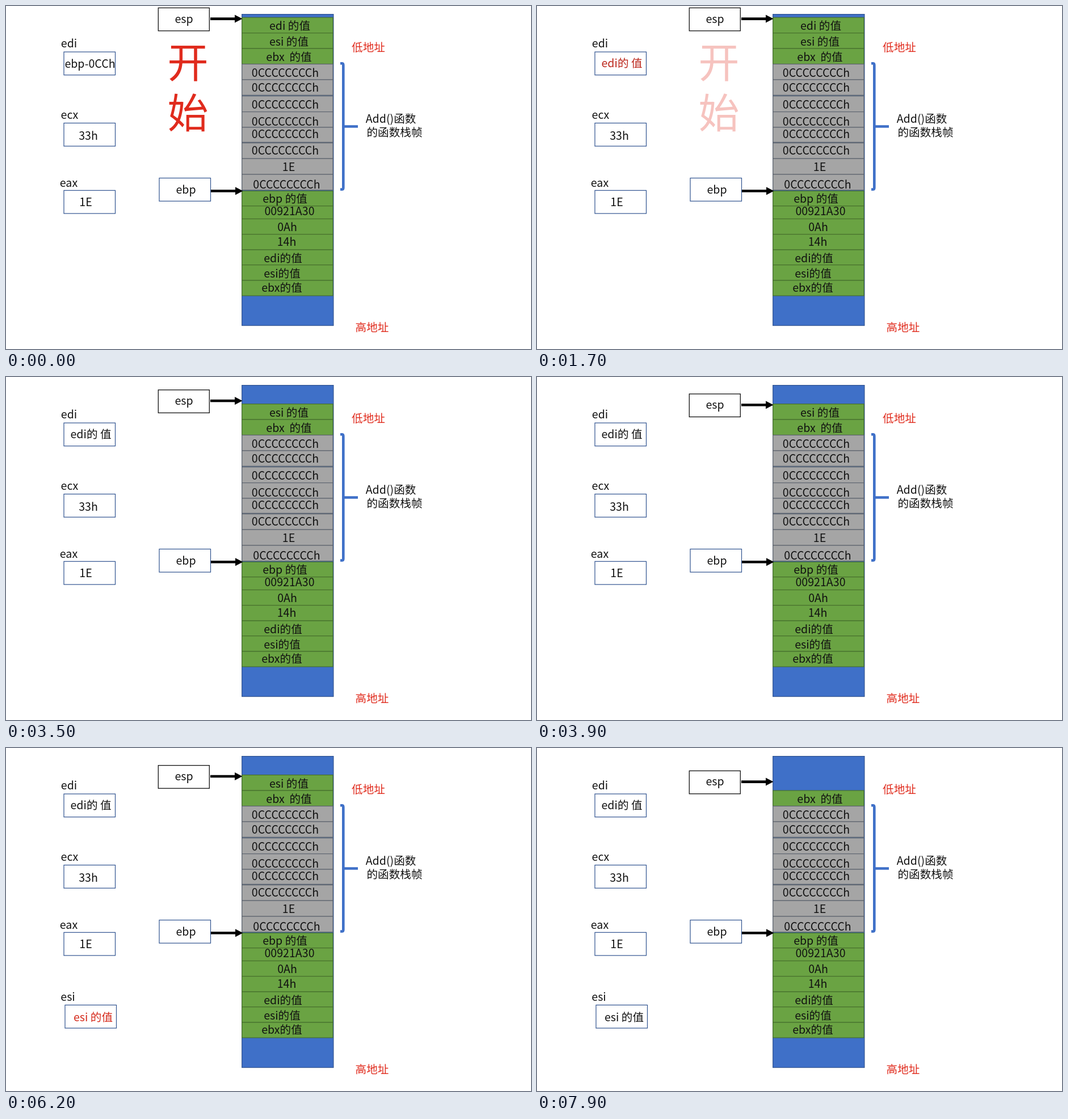
An HTML page that plays this animation: 925x605 px, repeating every 8000 ms.

```html
<!DOCTYPE html>
<html lang="zh-CN">
<head>
<meta charset="utf-8">
<title>Stack frame</title>
<style>
  html, body { margin: 0; width: 100%; height: 100%; overflow: hidden; background: #fff; }
  svg { display: block; width: 925px; height: 605px; }
  text {
    font: 350 19.6px "Noto Sans CJK SC", "Noto Sans CJK", "Noto Sans", sans-serif;
    text-anchor: middle; white-space: pre; fill: #111;
  }
  .red { fill: #e02b1d; }
  .big { font-size: 72px; }
</style>
</head>
<body>
<svg id="stage" viewBox="0 0 925 605"></svg>
<script>
const LOOP = 8000, STEP = 100;
const GREEN = ['#6aa343', '#47702d'], GRAY = ['#a5a5a5', '#5f6670'];
const BLUE = '#3f70c8', NAVY = '#2f528f', INK = '#111', RED = [224, 43, 29];
const stage = document.getElementById('stage');

function add(tag, attrs, parent = stage) {
  const el = document.createElementNS('http://www.w3.org/2000/svg', tag);
  for (const key in attrs) el.setAttribute(key, attrs[key]);
  parent.appendChild(el);
  return el;
}
const group = () => add('g', {});
function label(str, x, y, parent, cls = '') {
  const el = add('text', { x, y, class: cls }, parent);
  el.textContent = str;
  return el;
}
function box(x, y, width, height, fill, stroke, parent, weight = 1.2) {
  return add('rect', { x, y, width, height, fill, stroke, 'stroke-width': weight }, parent);
}
function arrow(x, y, parent) {
  add('path', { d: `M${x} ${y}h45`, stroke: '#000', 'stroke-width': 4.6 }, parent);
  add('path', { d: `M${x + 43} ${y - 7}l13.5 7l-13.5 7z`, fill: '#000' }, parent);
}
function register(name, nameX, nameY, x, y, parent) {
  label(name, nameX, nameY, parent);
  box(x, y, 90.5, 40.7, '#fff', NAVY, parent);
}

// Stack column: top, bottom, text, text centre, baseline
box(415.7, 14.6, 161.2, 549, BLUE, NAVY);
const FILLER = '0CCCCCCCCh';
const cells = [
  [20.3, 47.6, 'edi 的值', 500, 42],
  [47.6, 75, 'esi 的值', 498.5, 70],
  [75, 102.5, 'ebx  的值', 498.5, 97],
  [102.5, 130, FILLER, 492, 125],
  [130, 157.3, FILLER, 492, 151],
  [158.8, 186.6, FILLER, 492, 181],
  [186.6, 214, FILLER, 492, 211],
  [214, 240.3, FILLER, 492, 233],
  [241.6, 269.2, FILLER, 492, 261.5],
  [269.2, 297, '1E', 498, 291],
  [297, 324.6, FILLER, 494.5, 321.5],
  [326.3, 352.7, 'ebp 的值', 491.5, 347],
  [352.7, 375.5, '00921A30', 499.5, 369],
  [375.5, 402.7, '0Ah', 495.5, 396.5],
  [402.7, 430, '14h', 494.5, 422.5],
  [430, 456.7, 'edi的值', 488, 451.5],
  [456.7, 484, 'esi的值', 486.5, 478.5],
  [484, 511, 'ebx的值', 486, 503.5]
].map(([top, bottom, str, x, y], i) => {
  const g = group();
  const [fill, edge] = i > 2 && i < 11 ? GRAY : GREEN;
  box(415.7, top, 160.3, bottom - top, fill, edge, g);
  label(str, x, y, g);
  return g;
});

add('path', {
  d: 'M589 101.3h3q2.3 0 2.3 3V320.5q0 3-2.3 3h-3M594.3 212.5H620',
  fill: 'none', stroke: BLUE, 'stroke-width': 4.6
});
label('Add()函数', 678, 205.5);
label('的函数栈帧', 684.5, 229.5);
label('低地址', 638.5, 79.5, stage, 'red');
label('高地址', 645, 574, stage, 'red');

register('edi', 111, 72.5, 102, 81);
register('ecx', 112, 198.5, 102, 206.5);
register('eax', 110.5, 319, 102, 325.3);
label('33h', 145, 235.5);
label('1E', 140.5, 353);
const ediOld = label('ebp-0CCh', 148, 109);
const ediNew = label('edi的 值', 149.5, 107.5);

const esi = group();
register('esi', 109, 446, 104, 453.4, esi);
const esiText = label('esi 的值', 153.5, 482, esi);

const esp = group();
box(268.3, 3.3, 90, 40.5, '#fff', INK, esp, 1.3);
label('esp', 313.5, 29.5, esp);
arrow(360, 22.6, esp);
box(270, 303.5, 90.5, 40.7, '#fff', NAVY);
label('ebp', 317, 331);
arrow(361, 326.3);

const title = group();
label('开', 320.5, 125.5, title, 'red big');
label('始', 320.5, 215, title, 'red big');

const ramp = (t, from, to) => Math.min(1, Math.max(0, (t - from) / (to - from)));
const fade = (el, value) => el.setAttribute('opacity', value);
const fadeOut = (el, t, from) => fade(el, 1 - ramp(t, from, from + 270));
const fadeIn = (el, t, from) => fade(el, ramp(t, from, from + 700));
function darken(el, t, from) {
  const k = ramp(t, from, from + 960);
  el.style.fill = `rgb(${RED.map(c => Math.round(c + (17 - c) * k))})`;
}

// Share of one pop covered after each 100 ms
const POP = [0, .065, .19, .35, .54, .71, .82, .89, .94, .97, .99, 1];
function pop(t, from) {
  const u = ramp(t, from, from + 1100) * 11, i = Math.min(10, Math.floor(u));
  return POP[i] + (POP[i + 1] - POP[i]) * (u - i);
}

function draw(t) {
  fadeOut(ediOld, t, 60);
  fadeIn(ediNew, t, 370);
  darken(ediNew, t, 1530);
  fadeOut(title, t, 1505);
  fadeOut(cells[0], t, 3040);
  fadeIn(esi, t, 5040);
  darken(esiText, t, 6150);
  fadeOut(cells[1], t, 7630);
  const y = 27.4 * (pop(t, 3000) + pop(t, 7600));
  esp.setAttribute('transform', `translate(0 ${y.toFixed(2)})`);
}
function tick() {
  draw(Math.floor((performance.now() % LOOP) / STEP) * STEP);
  requestAnimationFrame(tick);
}
tick();
</script>
</body>
</html>
```
